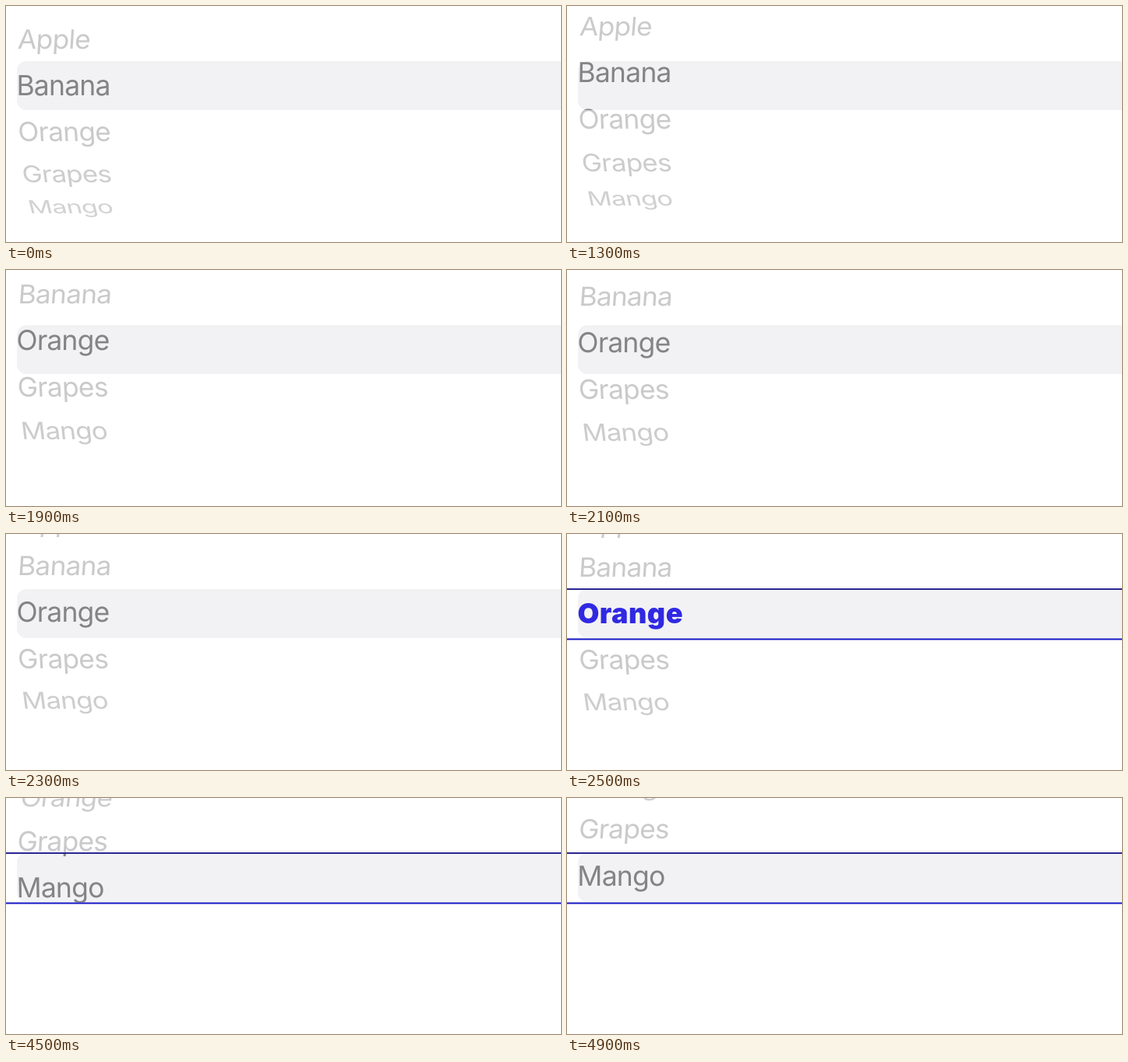
An HTML page with a canvas that plays this animation: 712 px wide and 304 px high, repeating every 5 s.

```html
<!DOCTYPE html>
<html lang="en">
<head>
<meta charset="utf-8">
<title>Wheel picker</title>
<style>
  html, body { margin: 0; width: 100%; height: 100%; overflow: hidden; background: #fff; }
  canvas { display: block; }
</style>
</head>
<body>
<canvas id="stage" width="712" height="304"></canvas>
<script>
const ctx = document.getElementById('stage').getContext('2d');
const LOOP = 5000, STEP = 100;
const ITEMS = ['Apple', 'Banana', 'Orange', 'Grapes', 'Mango'];
const FAMILY = 'Inter, Roboto, "Liberation Sans", sans-serif';

// Wheel geometry: drum radius, angle between rows, viewing distance, vanishing point
const RADIUS = 221, ANGLE = 15.8 * Math.PI / 180, DISTANCE = 1910;
const LEFT = 13.4, MID = 102, VANISH = 432;
const BAND = { top: 71, bottom: 134 };

// Scroll position in rows, one value per step from the start of each drag
const DRAGS = [
  { start: 1200, path: [1, 1.28, 1.6, 1.85, 2.035, 2.13, 2.18, 2.19, 2.18, 2.14, 2.08, 2.03, 2] },
  { start: 4000, path: [2, 2.49, 2.95, 3.3, 3.58, 3.78, 3.92, 3.98, 4.02, 4.035] }
];

function scrollAt(t) {
  const drag = t < DRAGS[1].start ? DRAGS[0] : DRAGS[1];
  const i = Math.floor((t - drag.start) / STEP);
  return drag.path[Math.max(0, Math.min(i, drag.path.length - 1))];
}

function drawRow(text, offset, color, bold) {
  const a = offset * ANGLE, sin = Math.sin(a), cos = Math.cos(a);
  const scale = DISTANCE / (DISTANCE + RADIUS * (1 - cos));
  ctx.save();
  ctx.transform(scale, 0, (VANISH - LEFT) / DISTANCE * sin, cos * scale,
    VANISH + (LEFT - VANISH) * scale, MID + RADIUS * sin * scale);
  ctx.font = bold ? `900 36px ${FAMILY}` : `400 35.5px ${FAMILY}`;
  ctx.letterSpacing = bold ? '0.5px' : '-0.8px';
  ctx.globalAlpha = (1 + cos) / 2;
  ctx.fillStyle = color;
  ctx.fillText(text, 0, 13);
  ctx.restore();
}

function drawRows(scroll, color, chosen) {
  ITEMS.forEach((text, i) => {
    const blue = i === chosen;
    drawRow(text, i - scroll, blue ? '#3029e2' : color, blue);
  });
}

function clipped(top, bottom, paint) {
  ctx.save();
  ctx.beginPath();
  ctx.rect(0, top, 712, bottom - top);
  ctx.clip();
  paint();
  ctx.restore();
}

function draw(t) {
  const scroll = scrollAt(t);
  const chosen = t >= 2500 && t < 4200 ? 2 : -1;
  const pale = () => drawRows(scroll, '#c9c9ca');

  ctx.fillStyle = '#fff';
  ctx.fillRect(0, 0, 712, 304);
  ctx.fillStyle = '#f2f2f4';
  ctx.beginPath();
  ctx.roundRect(14, BAND.top, 740, BAND.bottom - BAND.top, 12);
  ctx.fill();

  clipped(0, BAND.top, pale);
  clipped(BAND.bottom, 304, pale);
  clipped(BAND.top, BAND.bottom, () => drawRows(scroll, '#848487', chosen));

  if (t >= 2400) {
    ctx.fillStyle = '#2b2690';
    ctx.fillRect(0, 70, 712, 2);
    ctx.fillStyle = '#1616c4';
    ctx.fillRect(0, 134.5, 712, 2);
  }
}

function frame() {
  const t = performance.now() % LOOP;
  draw(Math.floor(t / STEP) * STEP);
  requestAnimationFrame(frame);
}
frame();
</script>
</body>
</html>
```
